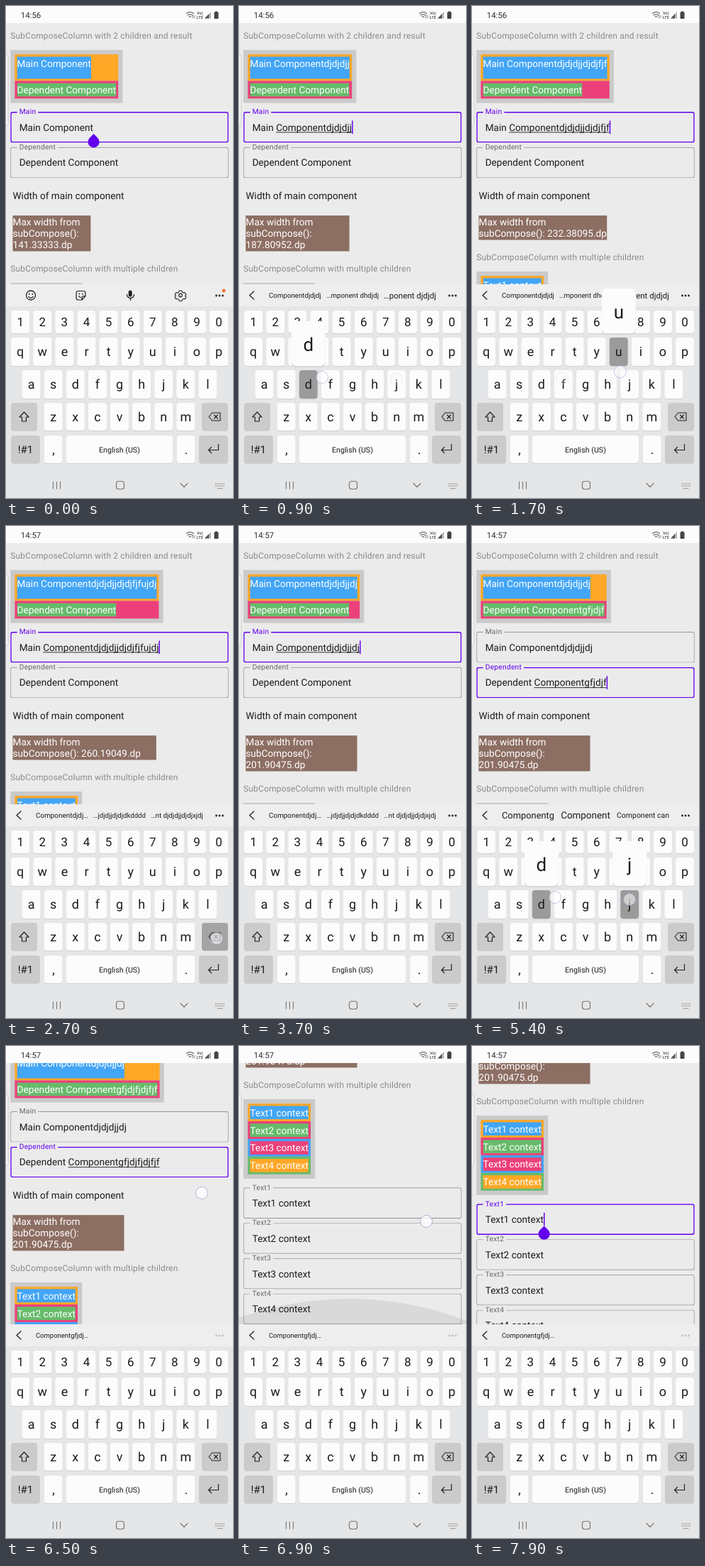
An HTML page that plays this animation: 320 by 693 pixels, repeating every 8000 ms.

```html
<!DOCTYPE html>
<html lang="en">
<head>
<meta charset="utf-8">
<title>Column demo</title>
<style>
html, body { margin: 0; width: 100%; height: 100%; overflow: hidden; background: #ebebeb; }
body { font-family: Roboto, "Noto Sans", sans-serif; color: #1c1c1c; text-rendering: geometricPrecision; }
#stage { position: absolute; left: 0; top: 0; width: 320px; height: 693px; overflow: hidden; background: #ebebeb; }
#view { position: absolute; left: 0; top: 24px; width: 320px; height: 368px; overflow: hidden; }
/* the page is laid out in device pixels, 1080 wide, and scaled down */
#page, #lower { position: absolute; left: 0; top: 0; width: 1080px; }
#page { top: -24px; transform-origin: 0 0; font-size: 46px; line-height: 54px; }
#page div { white-space: pre; }
.head { position: absolute; left: 21px; font-size: 40.4px; letter-spacing: .6px; color: #8a8a8a; }
.panel { position: absolute; left: 21px; padding: 21px; background: #cacaca; }
.row { padding: 10.5px; color: #fff; }
.row span { display: block; width: fit-content; padding: 6px 0 3px; }
.field { position: absolute; left: 21px; width: 1038px; height: 147px; border-radius: 10.5px; box-shadow: inset 0 0 0 3px #929292; }
.field label { position: absolute; left: 31.5px; top: -21px; padding: 0 10.5px; line-height: 42px; font-size: 34.65px; letter-spacing: .8px; color: #676767; background: #ebebeb; }
.field p { position: absolute; left: 42px; top: 42px; margin: 0; padding: 6px 0 3px; }
.field u { text-decoration: none; }
.field u.on { text-decoration: underline; text-decoration-thickness: 3px; text-underline-offset: 6px; text-decoration-skip-ink: none; }
.field i { position: absolute; left: 100%; top: 0; width: 5px; height: 63px; background: #6200ee; visibility: hidden; }
.field b { position: absolute; left: 100%; top: 74px; width: 54px; height: 54px; margin-left: -25px; border-radius: 0 50% 50% 50%; transform: rotate(45deg); background: #6200ee; visibility: hidden; }
.focus { box-shadow: inset 0 0 0 5px #6200ee; z-index: 2; }
.focus label { color: #6200ee; }
#width { position: absolute; left: 32px; top: 877px; }
#note { position: absolute; left: 32px; top: 996px; padding: 6px 0 2px; color: #fff; background: #8d6e63; }
svg { position: absolute; left: 0; top: 0; }
svg text { text-anchor: middle; }
</style>
</head>
<body>
<div id="stage">
  <div id="view">
    <div id="page"></div>
    <svg width="320" height="368"><circle id="glow" cx="155" r="458" fill="#000"/></svg>
  </div>
  <svg id="chrome" width="320" height="693" viewBox="0 0 320 693"></svg>
</div>
<script>
const LOOP = 8000, STEP = 100, SCALE = 320 / 1080;
const ORANGE = '#ffa726', BLUE = '#42a5f5', PINK = '#ec407a', GREEN = '#66bb6a';
const $ = id => document.getElementById(id);

function add(parent, html) {
  parent.insertAdjacentHTML('beforeend', html);
  return parent.lastElementChild;
}

// ---- scrolling page ----
const page = $('page');
const head = (to, y, text) => add(to, `<div class="head" style="top:${y}px">${text}</div>`);
const row = (edge, fill, text) =>
  `<div class="row" style="background:${edge}"><span style="background:${fill}">${text}</span></div>`;

function field(to, y, name, text) {
  const box = add(to, `<div class="field" style="top:${y}px"><label>${name}</label><p><span></span><u></u><i></i><b></b></p></div>`);
  const [plain, word, caret, handle] = box.querySelector('p').children;
  const cut = text.indexOf(' ') + 1;
  plain.textContent = text.slice(0, cut);
  return {
    set(extra, focused, blink, grip) {
      word.textContent = text.slice(cut) + extra;
      word.className = focused && extra ? 'on' : '';
      box.className = focused ? 'field focus' : 'field';
      caret.style.visibility = focused && blink ? 'visible' : 'hidden';
      handle.style.visibility = focused && grip ? 'visible' : 'hidden';
    }
  };
}

head(page, 115, 'SubComposeColumn with 2 children and result');
const duo = add(page, `<div class="panel" style="top:209px">${row(ORANGE, BLUE, '')}${row(PINK, GREEN, '')}</div>`);
const [duoMain, duoDep] = duo.querySelectorAll('span');
duoMain.style.height = '96px';
const mainField = field(page, 503, 'Main', 'Main Component');
const depField = field(page, 671, 'Dependent', 'Dependent Component');
add(page, '<div id="width">Width of main component</div>');
const note = add(page, '<div id="note"></div>');
const lower = add(page, '<div id="lower"></div>');
head(lower, 1222, 'SubComposeColumn with multiple children');
const pairs = [[ORANGE, BLUE], [PINK, GREEN], [BLUE, PINK], [GREEN, ORANGE]];
add(lower, `<div class="panel" style="top:1316px">${pairs.map((p, i) => row(...p, `Text${i + 1} context`)).join('')}</div>`);
const texts = pairs.map((_, i) => field(lower, 1736 + i * 168, `Text${i + 1}`, `Text${i + 1} context`));

// ---- status bar, keyboard, navigation ----
const chrome = $('chrome');
const rect = (x, y, w, h, fill, r = 0, more = '') =>
  `<rect x="${x}" y="${y}" width="${w}" height="${h}" rx="${r}" fill="${fill}" ${more}/>`;
const label = (x, y, size, text, more = 'fill="#1c1c1c"') =>
  `<text x="${x}" y="${y + size * .34}" font-size="${size}" ${more}>${text}</text>`;
const line = (d, width = 1.3, color = '#222') =>
  `<path d="${d}" fill="none" stroke="${color}" stroke-width="${width}" stroke-linecap="round" stroke-linejoin="round"/>`;
const dots = color => [296.5, 301, 305.5].map(x => `<circle cx="${x}" cy="408" r="1.4" fill="${color}"/>`).join('');
const keyBox = (x, y, w, h, fill) => rect(x, y + 1, w, h, '#cfd0d2', 4) + rect(x, y, w, h, fill, 4);

const LIGHT = '#fcfcfc', DARK = '#cbcbcb';
const keys = {};
let art = rect(0, 0, 320, 24, '#fcfcfc') + rect(0, 392, 320, 31, '#eeeeee') + rect(0, 423, 320, 270, '#e5e6e8');
art += rect(-4, 68, 7, 101, '#f6f6f6', 3, 'stroke="#c4c4c4" stroke-width=".8"');

const rows = [['1234567890', 20.2, 429, 32], ['qwertyuiop', 20.2, 467, 40], ['asdfghjkl', 35.6, 513, 40], ['zxcvbnm', 66.7, 559, 39]];
for (const [chars, x0, y, h] of rows) {
  [...chars].forEach((c, i) => {
    const x = x0 + i * 31.1;
    keys[c] = [x, y, h];
    art += keyBox(x - 13, y, 26, h, LIGHT) + label(x, y + h / 2 + .2, h < 35 ? 17 : 18, c);
  });
}
for (const [x, y, w, fill] of [[7, 559, 37, DARK], [276, 559, 37, DARK], [7, 605, 41, DARK], [54, 605, 25.5, LIGHT],
  [85, 605, 150, LIGHT], [241, 605, 25.5, LIGHT], [272, 605, 41, DARK]]) art += keyBox(x, y, w, 39, fill);
art += label(27.5, 624.5, 15, '!#1') + label(67, 625, 18, ',') + label(160, 625, 10.7, 'English (US)') + label(254, 625, 18, '.');
const eraseIcon = line('M286 578.5l4.5-5.5h11.5v11h-11.5zM293.5 576l5 5m0-5l-5 5', 1.1);
art += line('M25.5 572l6.5 7h-3.5v6h-6v-6h-3.5z', 1.2) + eraseIcon;
art += line('M299.5 617.5v8h-14m4-4l-4 4 4 4', 1.2);

// navigation and status icons
art += line('M66.5 670v10M71.5 670v10M76.5 670v10', 1.1, '#777');
art += rect(155.5, 669.5, 11, 11, 'none', 3, 'stroke="#777" stroke-width="1.2"');
art += line('M246 672.5l5 5 5-5', 1.2, '#777');
art += '<path d="M295 673h13M295 676h13" stroke="#999" stroke-width="1.5" stroke-dasharray="1.6 1.3"/>' + line('M298 679.5h7', 1.2, '#999');
art += line('M254.5 10.5q5-4 10 0M256.3 13q3.2-2.6 6.4 0M258.2 15.3q1.3-1 2.6 0', 1.1, '#555');
art += line('M263.5 13v4M266 17v-4', .8, '#666');
art += label(273.3, 10.5, 5.6, 'Vo)', 'fill="#444" font-weight="500"') + label(273.3, 16, 5.6, 'LTE', 'fill="#444" font-weight="500"');
art += '<path d="M289 8v9.5h-9z" fill="#b5b5b5"/><path d="M286 11.200v6.300h-6z" fill="#555"/>';
art += rect(293.5, 8.5, 6, 9.5, '#444', 1) + rect(295, 7.5, 3, 2, '#444');
add(chrome, `<g>${art}</g>`);

const clock = add(chrome, label(35, 13, 11.5, '', 'fill="#333"'));
const icons = add(chrome, `<g>
  <circle cx="35" cy="407.5" r="6.5" fill="none" stroke="#222" stroke-width="1.3"/>
  <circle cx="32.7" cy="405.8" r="1" fill="#222"/><circle cx="37.3" cy="405.8" r="1" fill="#222"/>
  ${line('M31.8 409.5q3.2 3.6 6.4 0', 1.2)}
  ${line('M102 401.5h7a3 3 0 0 1 3 3v4l-5 5.5h-5a3 3 0 0 1-3-3v-6.5a3 3 0 0 1 3-3zM112 408.5h-2.500a2.500 2.500 0 0 0-2.500 2.500v3M102.500 408.500q1 2 3 2', 1.2)}
  <circle cx="103.5" cy="405.5" r=".9" fill="#222"/><circle cx="108" cy="405.5" r=".9" fill="#222"/>
  ${rect(172.7, 400.5, 5, 9, '#222', 2.5)}${line('M170.5 406.5a5 5 0 0 0 10 0M175.5 411.5v3')}
  <circle cx="246" cy="407.5" r="2.3" fill="none" stroke="#222" stroke-width="1.2"/>
  ${line('M244.3 401h3.4l.7 2 2 1.1 2-.4 1.6 2.9-1.5 1.7 1.5 1.6-1.6 2.9-2-.4-2 1.2-.7 1.9h-3.4l-.7-1.9-2-1.2-2 .4-1.6-2.9 1.5-1.6-1.5-1.7 1.6-2.9 2 .4 2-1.1z', 1.1)}
  ${dots('#222')}<circle cx="307" cy="401" r="2.5" fill="#f0793a"/></g>`);
const hints = add(chrome, '<g></g>');
const live = add(chrome, '<g></g>');

// ---- story ----
const mainTyped = 'djdjdjjdjdjfjfujdjdj', depTyped = 'gfjdjfjdjfjf';
const advance = { d: 26, j: 11, f: 16, u: 25 };   // device pixels
const mainAt = i => 200 + i * 110;
const depAt = i => i < 6 ? 4440 + i * 170 : 4960 + i * 80;
const HOLD = 130, FADE = 100;
const spots = { d: [117, 523], f: [127, 525], j: [222, 526], u: [209, 515], g: [156, 528] };

const hintSteps = [
  [100, ['Componentd', 'Component', 'Component did']],
  [600, ['Componentdjdjdj', '…mponent dhdjdj', '…ponent djdjdj']],
  [2100, ['Componentdjdj…', '…jdjdjjdjdjdkdddd', '…nt djdjdjjdjdjxjdj']],
  [4500, ['Componentg', 'Component', 'Component can']],
  [5800, ['Componentgfjdj…']]
];
const scrollSteps = [[6200, 0], [6500, 57], [6600, 140], [6700, 225], [6800, 300], [6850, 315], [7000, 315], [7300, 292]];
const glowSteps = [[6780, 0], [6900, 1], [7000, .6], [7200, 0]];
// each drag: [time, x, y] points
const drags = [
  [[3900, 192, 222], [4000, 192, 222]],
  [[6100, 276, 272], [6200, 276, 264], [6500, 276, 207], [6600, 277, 128]],
  [[6700, 268, 330], [6800, 266, 272], [6900, 264, 247], [7000, 264, 243], [7300, 262, 266]],
  [[7400, 200, 244], [7500, 200, 244]]
];

function at(steps, t, k = 1) {
  if (t <= steps[0][0]) return steps[0][k];
  for (let i = 1; i < steps.length; i++) {
    const a = steps[i - 1], b = steps[i];
    if (t <= b[0]) return a[k] + (b[k] - a[k]) * (t - a[0]) / (b[0] - a[0]);
  }
  return steps[steps.length - 1][k];
}

const typedCount = (text, when, t) => [...text].filter((_, i) => t >= when(i)).length;
const touch = (x, y, o = 1) =>
  `<circle cx="${x}" cy="${y}" r="8.5" fill="#fff" fill-opacity="${.75 * o}" stroke="#9a94c8" stroke-opacity="${.7 * o}"/>`;

function presses(text, when, t) {
  let under = '', over = '';
  [...text].forEach((c, i) => {
    const age = t - when(i) + HOLD;
    if (age < 0 || age > HOLD + FADE) return;
    const [x, y, h] = keys[c];
    if (age < HOLD) {
      under += rect(x - 13, y, 26, h, '#9b9b9b', 4) + label(x, y + h / 2 + .2, 18, c);
      over += rect(x - 24, y - 68, 48, 64, '#d6d6d6', 7) + rect(x - 24, y - 69, 48, 63, '#fcfcfc', 7) + label(x, y - 35.5, 26, c);
      over += touch(...spots[c], .7);
    } else over += touch(...spots[c], .25);
  });
  return under + over;
}

const ruler = document.createElement('canvas').getContext('2d');
ruler.font = '100px Roboto, "Noto Sans", sans-serif';
const fitSize = text => Math.max(9.5, Math.min(13.4, 7400 / ruler.measureText(text).width));

function drawHints(t) {
  const step = hintSteps.filter(s => t >= s[0]).pop();
  icons.style.display = step ? 'none' : '';
  if (!step) return '';
  const words = step[1].map((w, i) => label(79 + i * 81, 407.7, fitSize(w), w));
  return line('M21 402l-6 5.5 6 5.5') + words.join('') + dots(step[1].length > 1 ? '#222' : '#c0c0c0');
}

function draw(t) {
  const erased = Math.max(0, Math.min(11, Math.floor((t - 2500) / 100)));
  const extraMain = mainTyped.slice(0, typedCount(mainTyped, mainAt, t) - erased);
  const extraDep = depTyped.slice(0, typedCount(depTyped, depAt, t));
  const focus = t < 4000 ? 0 : t < 7500 ? 1 : 2;

  const edits = [-500, 4000, 7500];
  if (erased) edits.push(2500 + erased * 100);
  [...mainTyped].forEach((_, i) => edits.push(mainAt(i)));
  [...depTyped].forEach((_, i) => edits.push(depAt(i)));
  const blink = (t - Math.max(...edits.filter(e => e <= t))) % 1000 < 500;

  duoMain.textContent = 'Main Component' + extraMain;
  duoDep.textContent = 'Dependent Component' + extraDep;
  mainField.set(extraMain, focus === 0, blink, t < 100);
  depField.set(extraDep, focus === 1, blink, !extraDep);
  texts.forEach((f, i) => f.set('', focus === 2 && i === 0, blink, true));

  const px = [...extraMain].reduce((sum, c) => sum + advance[c], 371);
  const wide = px > 604;
  note.textContent = `Max width from\nsubCompose():${wide ? ' ' : '\n'}${+Math.fround(px / 2.625).toPrecision(8)}.dp`;
  note.style.width = px + 'px';
  lower.style.top = (wide ? -54 : 0) + 'px';
  page.style.transform = `translateY(${-at(scrollSteps, t)}px) scale(${SCALE})`;

  const pull = at(glowSteps, t);
  $('glow').setAttribute('cy', 368 - 36 * pull + 458);
  $('glow').setAttribute('fill-opacity', pull ? .04 + .04 * pull : 0);

  clock.textContent = t < 2500 ? '14:56' : '14:57';
  hints.innerHTML = drawHints(t);
  let html = presses(mainTyped, mainAt, t) + presses(depTyped, depAt, t);
  if (t >= 2500 && t <= 3600) html += rect(276, 559, 37, 39, '#a4a4a4', 4) + eraseIcon + touch(297, 581, .8);
  for (const d of drags) {
    if (t >= d[0][0] && t <= d[d.length - 1][0]) html += touch(at(d, t, 1), at(d, t, 2));
  }
  live.innerHTML = html;
}

const start = performance.now();
let last = -1;
function tick() {
  const t = Math.floor((performance.now() - start) % LOOP / STEP) * STEP;
  if (t !== last) draw(last = t);
  requestAnimationFrame(tick);
}
tick();
</script>
</body>
</html>
```
